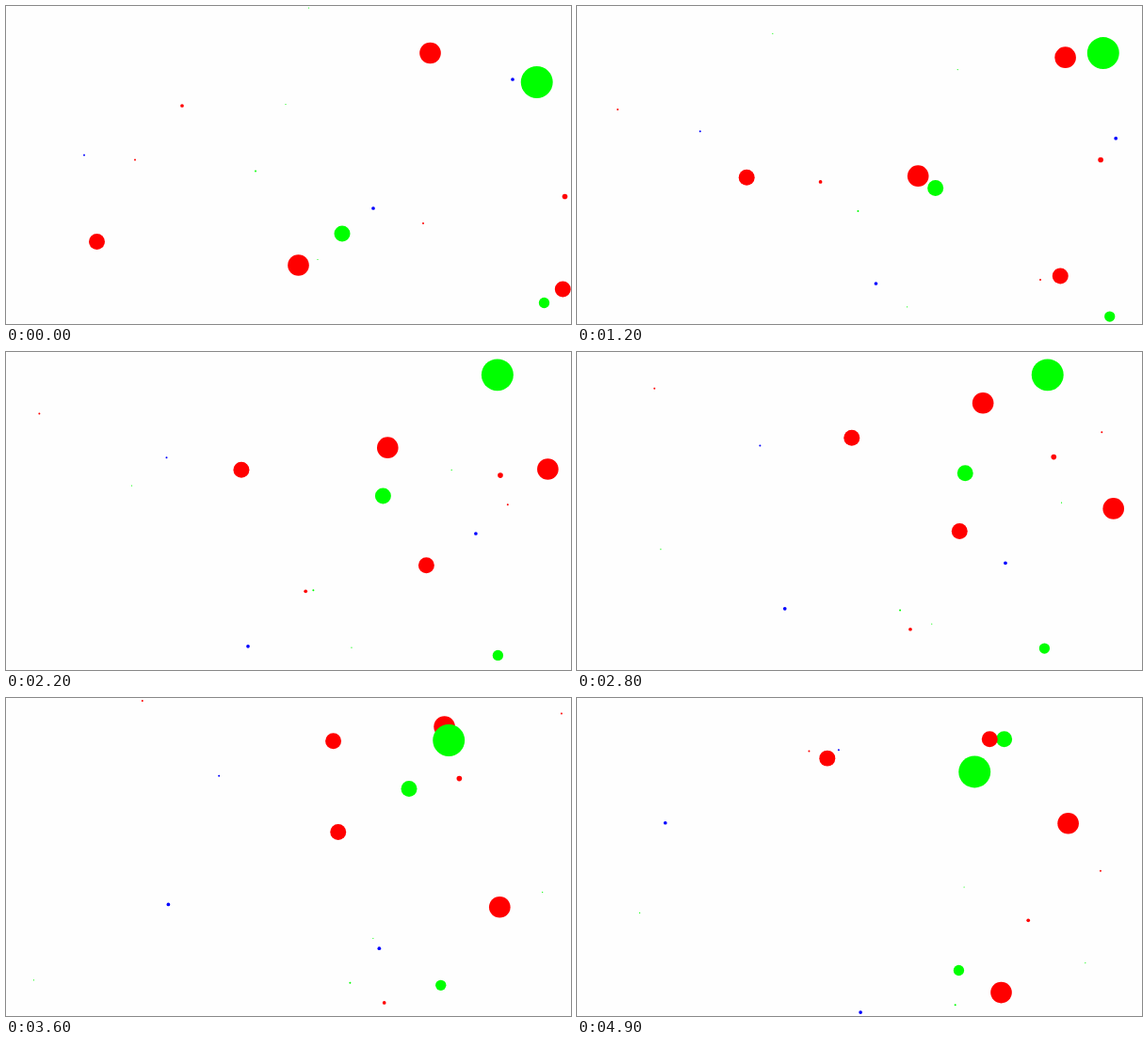
Write an HTML page that moves like this. It is 600 px wide and 338 px high and loops after 5000 ms.

```html
<!DOCTYPE html>
<html lang="en">
<head>
<meta charset="utf-8">
<title>Bouncing dots</title>
<style>
  html, body { margin: 0; width: 100%; height: 100%; overflow: hidden; background: #fefefe; }
  svg { display: block; width: 100%; height: 100%; }
</style>
</head>
<body>
<svg id="stage" viewBox="0 0 600 338"></svg>
<script>
const WIDTH = 600, HEIGHT = 338;
const LOOP = 5000, FRAME = 100;
const STEPS = 6;       // physics steps per shown frame
const PACE = 0.75;     // pixels per step in first gear
const UNIT = 2.83;     // large radii are multiples of this
const SMALL = 1.85, DOT = 1, SPECK = 0.6;
const RED = '#f00', GREEN = '#0f0', BLUE = '#00f';

const stage = document.getElementById('stage');
const balls = [];

// A ball starts at x, y and heads off at an angle in degrees
function add(color, r, gear, x, y, angle) {
  const dot = document.createElementNS('http://www.w3.org/2000/svg', 'circle');
  dot.setAttribute('r', r);
  dot.setAttribute('fill', color);
  stage.appendChild(dot);
  const a = angle * Math.PI / 180, speed = PACE * gear;
  balls.push({ dot, r, x, y, vx: speed * Math.cos(a), vy: speed * Math.sin(a) });
}

add(GREEN, 3 * UNIT, 1, 357, 242, -64);
add(RED, 4 * UNIT, 2, 450.5, 50, -50.9);
add(RED, 4 * UNIT, 2, 310.5, 275.5, -61.4);
add(RED, 3 * UNIT, 2, 96.5, 250.5, -39.2);
add(RED, 3 * UNIT, 2, 591.3, 301, 42);
add(GREEN, 6 * UNIT, 1, 563.7, 81, -34.9);
add(GREEN, 2 * UNIT, 1, 571.5, 315.5, 15.7);
add(RED, UNIT, 1, 593.5, 202.5, -133.8);
add(RED, SMALL, 2, 187, 106, 48.5);
add(BLUE, SMALL, 2, 538, 78, 35.5);
add(BLUE, SMALL, 2, 390, 215, 132.2);
add(BLUE, DOT, 1, 83, 158.5, -27.9);
add(RED, DOT, 2, 137, 163.5, -150.3);
add(RED, DOT, 3, 443, 231, 72.4);
add(GREEN, DOT, 1, 265, 175.5, 51.7);
add(GREEN, SPECK, 1, 331, 269.5, 68.7);
add(GREEN, SPECK, 2, 321.5, 2, -40);
add(GREEN, SPECK, 3, 297, 104.5, -123.4);

// Advance along one axis; the speed turns around once the wall is passed
function travel(pos, speed, r, size, steps) {
  for (let i = 0; i < steps; i++) {
    pos += speed;
    if (pos < r) speed = Math.abs(speed);
    if (pos > size - r) speed = -Math.abs(speed);
  }
  return pos;
}

function draw(ms) {
  const steps = Math.floor((ms % LOOP) / FRAME) * STEPS;
  for (const { dot, r, x, y, vx, vy } of balls) {
    dot.setAttribute('cx', travel(x, vx, r, WIDTH, steps));
    dot.setAttribute('cy', travel(y, vy, r, HEIGHT, steps));
  }
}

const start = performance.now();
function tick() {
  draw(performance.now() - start);
  requestAnimationFrame(tick);
}
tick();
</script>
</body>
</html>
```
